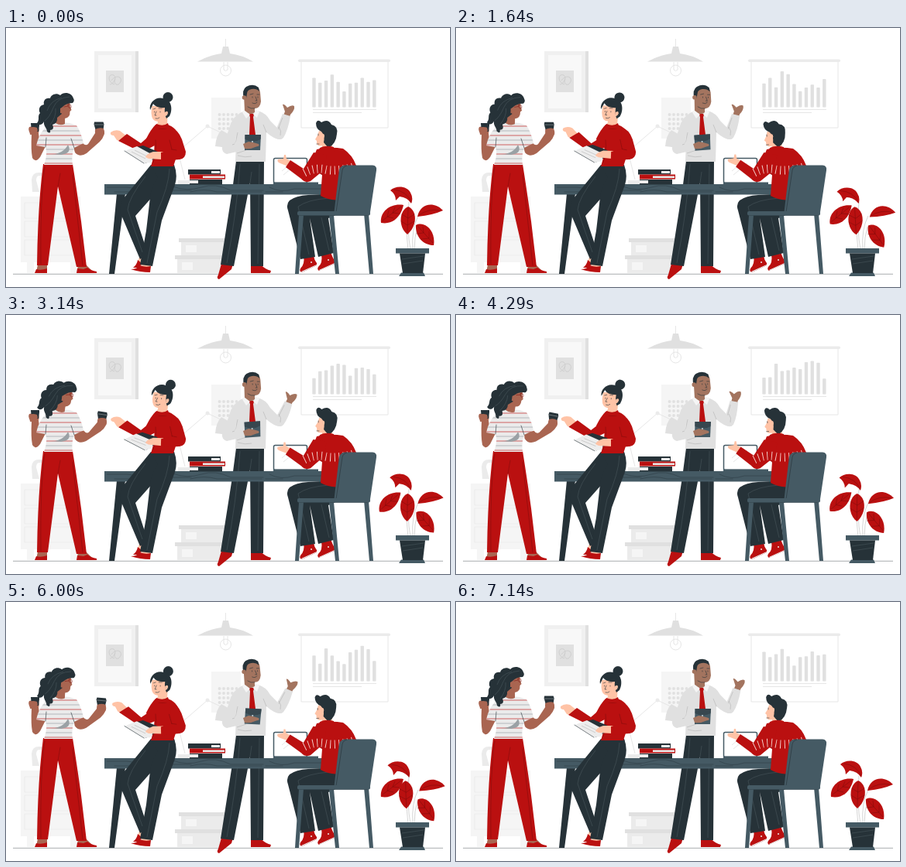
These frames come from a looping animation (573x335 px, 7210 ms). An HTML page:

```html
<!DOCTYPE html>
<html lang="en">
<head>
<meta charset="utf-8">
<title>Office meeting</title>
<style>
html, body { margin: 0; width: 100%; height: 100%; overflow: hidden; background: #fff; }
svg { display: block; width: 100vw; height: 100vh; }
.dark { fill: #263238; }
.slate { fill: #455a64; }
.red { fill: #ba1010; }
.brown { fill: #a96551; }
.tan { fill: #a3745f; }
.peach { fill: #ffc3a6; }
.cloth { fill: #e0e0e0; }
.g1 { fill: #f5f5f5; }
.g2 { fill: #ebebeb; }
.g3 { fill: #e0e0e0; }
.paper { fill: #ededed; }
.line { fill: none; stroke: #263238; stroke-width: .6; stroke-linecap: round; stroke-linejoin: round; }
.fold { fill: none; stroke: #7a0a0a; stroke-width: .5; stroke-linecap: round; }
.seam { fill: none; stroke: #5a676d; stroke-width: .4; }
.crease { fill: none; stroke: #aaa; stroke-width: .5; }
.pale { fill: none; stroke: #e6e6e6; stroke-width: 1; }
</style>
</head>
<body>
<svg viewBox="0 0 573 335">
<defs>
  <clipPath id="shirtShape"><path d="M55 125Q67 121 82 123L91 126Q97 135 100 149L88 155Q84 164 86 177H49Q54 164 51 154L39 152Q43 134 55 125Z"/></clipPath>
  <pattern id="stripes" width="90" height="12" patternUnits="userSpaceOnUse">
    <path class="g2" d="M0 0h90v12H0z"/>
    <path d="M0 1h90" stroke="#9aa1a5" stroke-width=".7"/>
    <path d="M0 7h90" stroke="#c63b3b" stroke-width=".8"/>
  </pattern>
  <pattern id="days" x="273" y="109" width="5.500" height="6" patternUnits="userSpaceOnUse">
    <circle class="g3" cx="2.500" cy="3" r="1.900"/>
  </pattern>
</defs>

<!-- wall -->
<path class="g3" d="M114 30h57v79h-57z"/>
<path d="M114 30h53v79h-53z" fill="#f0f0f0"/>
<path d="M119 35h43v69h-43z" fill="#f8f8f8"/>
<path class="g3" d="M129 55h23v28h-23z"/>
<path d="M140 73C130 70 132 58 139 61C144 64 138 73 134 73M136 68C143 58 152 65 147 71C143 77 138 70 141 66" fill="none" stroke="#cfcfcf"/>
<path class="pale" d="M283.500 14V24"/>
<path class="g3" d="M280 24h7l2 9Q305 35 319 43.500H247Q263 35 278 33z"/>
<circle class="pale" cx="283.500" cy="55" r="7"/>
<path class="pale" d="M281 44v10q2.500 3 5 0v-10"/>
<path class="g1" d="M265 90h38v53h-38z"/>
<path d="M273 109h27.500v24H273z" fill="url(#days)"/>
<path class="pale" d="M231 196L222 160L260 127L281 137"/>
<circle class="g2" cx="260" cy="127" r="2.500"/>
<path class="g3" d="M278 132L290 139L288 155L270 153Q271 139 278 132z"/>
<path class="g2" d="M222 197h18v5h-18z"/>
<path class="pale" d="M381 44v85h112v-85"/>
<rect class="g2" x="377" y="40.500" width="119" height="3.500" rx="1.700"/>
<g id="bars" class="g3"></g>
<path class="pale" d="M396 105.500h82M396 109.500h63"/>

<!-- cabinet and boxes -->
<path class="g1" d="M19 218h77v85h-77zM27 303h9v14h-9zM83 303h9v14h-9z"/>
<path class="pale" stroke-opacity=".5" d="M24 226h67v20h-67zM24 250h67v20h-67zM24 274h67v20h-67z"/>
<path class="g2" d="M33 196q1-9 9-9h7v4h-6q-4 0-4 6l4 15h-9z"/>
<path class="g3" d="M223 272h60v5h-60zM218 294h64v5h-64z"/>
<path class="g2" d="M226 277h56v17h-56zM221 299h61v18h-61z"/>
<path class="g1" d="M232 281h14v9h-14zM227 303h14v10h-14z"/>
<path d="M9 318.300H564" stroke="#6d7579" stroke-width=".6"/>

<!-- woman with coffee -->
<path class="brown" d="M41 306h12v10H39zM93 306h10l8 8H92z"/>
<path class="red" d="M39 312q6 2 14-1v6H37zM92 311l8 1 5-2q5 4 12 5v2H91z"/>
<path class="red" d="M48 176h38Q91 207 97 250L104 309H91L67 205L54 307H40Q41 230 48 176z"/>
<path class="fold" d="M67 205L70 188M50 180Q44 220 45 305M86 190L99 307"/>
<path class="brown" d="M40 147L31 136Q28 131 30 128L40 126Q44 130 42 136L43 144L51 153L44 167Q38 175 34 168Q32 158 33 138z"/>
<path class="dark" d="M32 123h11v3l-1 8h-9z"/>
<path class="brown" d="M30 129q5-2 10 0l1 4-5 4-5 1z"/>
<g id="coffeeArm">
  <path class="brown" d="M87 154L99 149Q103 153 106 150L115 136Q114 129 120 128Q128 129 127 137Q125 143 121 147L104 162Q95 168 89 161z"/>
  <path class="dark" d="M114 121.500h11.500l1 3-1 7h-10l-2-7z"/>
  <path d="M114 125h12" stroke="#a9b0b3" stroke-width=".5"/>
  <path class="brown" d="M115 131q6-3 11-1l1 6-9 3z"/>
</g>
<g clip-path="url(#shirtShape)">
  <path d="M30 115h80v70H30z" fill="url(#stripes)"/>
  <path d="M57 163Q73 164 80 151Q86 162 71 164z" fill="#9aa1a5"/>
</g>
<path class="line" d="M88 155L84 143M51 154L52 142"/>
<g id="coffeeHead">
  <path class="brown" d="M67 99L82 94L83 102L84.500 106L82.500 108Q83 116 76 117L76 124Q70 127 64 123z"/>
  <path class="dark" d="M87 91C85 83 74 82 70 87C64 83 58 87 57 91C50 90 48 95 49 99C42 100 42 107 44 110C40 114 44 118 40 123C43 127 47 125 49 121C48 127 53 129 53 134Q58 138 57 132Q63 132 60 125Q67 123 66 116L72 111Q69 104 73 102Q78 97 86 97Q89 94 87 91z"/>
  <path class="seam" d="M82 89Q66 90 61 103T50 120M72 90Q57 94 53 107M64 104Q65 115 57 125"/>
  <path class="brown" d="M70 104q5-3 5 2q-1 5-5 4z"/>
  <path class="fold" d="M75 102L80 101M80 99q5-1 4 4q-4 2-4-4"/>
</g>

<!-- standing man -->
<path class="red" d="M278 305h15l-2 7-16 13q-4-1-1-6zM316 306h13q5 6 13 8l-1 3h-25z"/>
<path class="dark" d="M297 172h36L332 308H316L315 200L294 308L277 306L292 210z"/>
<path class="seam" d="M302 176Q297 245 285 304M327 176L325 305M315 200l2-14"/>
<g id="waveArm">
  <path class="tan" d="M357 116L360 108L357 99Q359 98 363 103Q369 99 372 101Q373 106 367 112L365 118z"/>
  <path class="cloth" d="M357 111L367 114Q364 132 358 142Q352 147 346 140L349 130z"/>
  <path class="crease" d="M357 116l-7 18"/>
</g>
<path class="cloth" d="M306 108L325 107Q336 110 341 120L351 130L357 143Q350 147 336 135L335 173H296L297 145L294 122Q297 111 306 108z"/>
<path class="crease" d="M336 135l-4-10M299 165q10 3 18 1M352 128q4 5 2 11"/>
<path class="red" d="M313 111h8l-2 4 3 23-4 4-4-4 1-23z"/>
<path class="cloth" d="M299 113Q292 115 287 133L279 153Q278 161 285 163L311 157L309 148L296 149z"/>
<path class="crease" d="M296 149L299 135M295 150l-3 1M298 162l12-4"/>
<g id="tablet">
  <path class="slate" d="M308.500 138h20.500l-1 20H308z"/>
  <path d="M308.500 138h20.500l-.5 6q-9 5-20 0z" fill="#37474f"/>
  <circle cx="318" cy="147" r="1" fill="#cfd8dc"/>
</g>
<path class="tan" d="M306 150L313 147Q320 148 326 150Q328 153 323 153.500Q316 157 308 156z"/>
<g id="manHead">
  <path class="tan" d="M307 86Q309 75 319 75Q327 76 328 83L329 95Q328 104 321 104L321 109Q315 114 308 108z"/>
  <path class="dark" d="M307 91Q304 80 310 76Q319 71 326 77L327 82Q323 78 317 79Q311 80 311 85L310 91z"/>
  <circle class="tan" cx="307.500" cy="90" r="2.800"/>
  <path class="line" d="M315 86l4-1M324 86h3M318 89v1M325 89v1M322 89l2 5h-2M318 97q4 2 6-1M312 102q4 3 9 2"/>
</g>
<path class="g1" d="M307 106l8 6-5 5-5-8zM323 106l-4 6 5 4 3-8z"/>

<!-- table -->
<path class="dark" d="M143 214h11L140 318h-7z"/>
<path class="slate" d="M127 202H416v13.500H127z"/>
<path class="line" stroke-opacity=".7" d="M130 206h26q8 0 13 4h70M140 212h24M215 205q19 7 37 1t38 4h42M238 212q18-5 34 0h58M340 206q15 8 32 2h36M335 212h22"/>
<rect x="345.500" y="168.500" width="43" height="32" rx="2" fill="#fff" stroke="#455a64" stroke-width="1.500"/>
<path class="pale" d="M358 190l18-15M356 185l6-5"/>
<path class="slate" d="M345 199.500h58v2.500h-58z"/>
<path class="dark" d="M235 183h42v6.500h-42zM237 196h42v6.500h-42z"/>
<path class="red" d="M237 189.500h46v6h-46z"/>
<path class="paper" d="M265 185h11v3h-11zM254 191.500h28v2.500h-28zM237 197h11v4h-11z"/>

<!-- woman with notebook -->
<path class="peach" d="M172 296h10l-6 11h-7zM175 303h13l-2 8h-9z"/>
<path class="red" d="M170 300l6 5-6 5h-6q5-4 6-10zM173 307q7 3 14 1l-1 8q-13 0-25-4 8 0 12-5z"/>
<path class="dark" d="M187 177L152 220Q145 230 148 240L173 299L183 292L167 243L190 217L213 190z"/>
<path class="dark" d="M187 177H217Q222 190 218 203L201 249L189 308L173 306L181 262L186 219Q187 205 196 193z"/>
<path class="seam" d="M211 182Q210 205 195 238L182 304M180 192Q158 220 157 235L176 290"/>
<g id="reachArm">
  <path class="peach" d="M156 140L147 133Q140 131 135 135Q134 139 139 139L143 145L151 148z"/>
  <path class="red" d="M156 137L174 149L196 130L199 148L179 159Q171 162 165 156L145 146z"/>
</g>
<path class="red" d="M193 125Q203 121 211 126Q222 130 226 148L216 179H187Q193 160 191 148L183 154L181 143Q187 131 193 125z"/>
<path class="fold" d="M193 145Q195 160 190 174M194 129q8 3 16 0"/>
<g id="bookArm">
  <g id="notebook">
    <path class="dark" d="M168 154L177 152L196 160L192 169L180 175z"/>
    <path class="paper" d="M153 159L169 153L191 165L187 174L178 175z"/>
    <path class="line" d="M153 159L178 175"/>
    <path class="crease" d="M162 160l18 9M166 158l16 8"/>
  </g>
  <path class="peach" d="M203 160L190 160Q181 163 180 167L184 169L201 170z"/>
  <path class="red" d="M212 129Q222 131 227 144L232 160Q232 169 224 170L200 172V161L214 157z"/>
  <path class="fold" d="M214 157L211 145M214 157l6 1"/>
</g>
<g id="bookHead">
  <circle class="dark" cx="209" cy="89.500" r="6.500"/>
  <path class="peach" d="M188 101L209 101L208 126Q202 129 195 125L196 121Q188 121 187.500 110z"/>
  <path class="dark" d="M186 106C184 97 193 88 203 91C215 93 215 107 211 114L207 117Q204 111 205 103Q194 104 190 98Z"/>
  <path class="peach" d="M205 109q4-3 4 1q-1 4-4 4z"/>
  <path class="line" d="M190 105l3-1M197 104h4M191.500 108v1M199 108v1M194 108l-2 5h2M193 117q3 1 5-1"/>
</g>
<path class="red" d="M194 124Q203 128 209 123L211 130H193z"/>

<!-- seated man -->
<path class="red" d="M384 295l13-3q0 7 4 12v3l-19 9q-4-1-2-5 6-6 4-16zM407 293l12-3q2 6 5 11v4l-20 9q-3-2-1-5 6-5 4-16z"/>
<path class="paper" d="M381 315l20-9v1l-19 9zM404 313l20-9v1l-19 9z"/>
<circle class="paper" cx="394" cy="303" r="1"/>
<circle class="paper" cx="416" cy="300" r="1"/>
<path class="dark" d="M430 214L390 216Q374 217 366 223Q361 228 364 236L380 299L399 296L392 246L403 296L423 291L416 246L430 240z"/>
<path class="seam" d="M417 220Q389 222 377 231L391 293M407 245l10 43"/>
<path class="red" d="M401 157Q417 153 435 156Q447 164 452 178L432 222Q418 224 406 217L408 190L396 184Q396 167 401 157z"/>
<g id="talkArm">
  <path class="peach" d="M369 173L362 169L361 164H359L358 169L351 170Q349 173 354 175L364 179z"/>
  <path class="red" d="M367 171L384 182L397 161L414 164L411 183L393 198Q386 201 381 195L361 180z"/>
  <path class="fold" d="M408 190L402 180"/>
</g>
<path d="M385 187Q399 180 412 183T448 180" fill="none" stroke="#f5d5d0" stroke-width="11" stroke-dasharray=".9 4.800"/>
<g id="seatHead">
  <path class="peach" d="M404 133L421 136L421 154Q413 159 407 155L408 152Q400 154 401 146L399 144L402 139z"/>
  <path class="dark" d="M400 123Q402 117 407 122Q416 117 420 125Q429 127 427 137Q426 150 416 155L410 148Q412 139 407 134Q400 131 400 123z"/>
  <path class="peach" d="M407 138q4-3 4 2q-1 5-4 4z"/>
  <path class="line" d="M403 137v2M401 150h3"/>
</g>
<path class="red" d="M405 155Q413 151 423 154L424 160H403z"/>

<!-- chair -->
<path class="slate" d="M378 242h6L378 318h-5zM417 242h6L430 318h-5zM462 240h6L474 318h-5z"/>
<path class="slate" d="M437 177.500H473Q479 178 478 184L470 238Q469 242 464 242H423L430 183Q432 178 437 177.500z"/>
<path class="line" d="M440 178Q435 179 434 184L426 238M378 242.500h88"/>
<rect class="slate" x="376" y="237" width="94" height="5.500" rx="2"/>

<!-- plant -->
<path class="crease" d="M522 287Q517 260 520 225M525 287Q523 260 532 243M527 287Q527 270 531 257M519 287Q517 268 517 260"/>
<g id="leafTop"><path class="red" d="M496 210C503 203 518 204 522 213Q526 220 523 227Q518 219 508 218L503 223Q503 215 496 210z"/><path class="fold" d="M501 209Q517 211 523 225"/></g>
<g id="leafLeft"><path class="red" d="M513 229C496 226 482 238 484 252C500 255 510 243 513 229z"/><path class="fold" d="M510 231L486 249M502 232l-3 7 9 1M494 236l-2 8 8 2"/></g>
<g id="leafRight"><path class="red" d="M531 244C534 228 551 223 564 236Q551 242 531 244z"/><path class="fold" d="M533 242Q545 233 560 236"/></g>
<g id="leafLow"><path class="red" d="M529 255C540 249 555 262 552 281C537 281 528 268 529 255z"/><path class="fold" d="M531 256L551 278M538 257l1 8-9 1M546 263v9l-10 1"/></g>
<g id="leafMid"><path class="red" d="M519 231C531 236 531 256 518 267C506 258 507 236 519 231z"/><path class="fold" d="M519 233L518 264M511 241l8 5 8-5M510 250l8 5 9-5"/></g>
<path class="slate" d="M503 285h43v6.500h-43zM510 316.500h29l2 4.500h-34z"/>
<path class="dark" d="M508 291.500h33l-3 25.500h-26z"/>
<path class="seam" d="M511 299l28-4M512 305l26-4"/>
</svg>
<script>
const LOOP = 7210, STEPS = 101, TAU = 2 * Math.PI;

// cosine wave over one loop, highest at the given peak (0 to 1)
const wave = (phase, peak, cycles = 1) => Math.cos(TAU * cycles * (phase - peak));

// each part swings about its joint, starting from the drawn pose
const sways = [
  { id: 'coffeeArm', joint: '96 158', swing: 6, peak: .6 },
  { id: 'coffeeHead', joint: '66 122', swing: 4.5, peak: .55 },
  { id: 'reachArm', joint: '172 153', swing: 4.5, peak: .25, cycles: 2 },
  { id: 'bookArm', joint: '225 165', swing: 2, peak: .3 },
  { id: 'notebook', joint: '188 165', swing: -4, peak: .4 },
  { id: 'bookHead', joint: '203 124', swing: 3, peak: .45 },
  { id: 'waveArm', joint: '354 141', swing: 7, peak: .37, cycles: 2 },
  { id: 'tablet', joint: '318 152', swing: -4, peak: .3 },
  { id: 'manHead', joint: '315 108', swing: 1.5, peak: .25 },
  { id: 'talkArm', joint: '390 190', swing: 1.5, peak: .13, cycles: 2 },
  { id: 'seatHead', joint: '412 156', swing: 3.5, peak: .45, cycles: 2 },
  { id: 'leafTop', joint: '523 285', swing: -1.8, peak: .25, cycles: 2 },
  { id: 'leafLeft', joint: '523 285', swing: -2, peak: .42 },
  { id: 'leafMid', joint: '521 285', swing: -2.5, peak: .25, cycles: 2 },
  { id: 'leafRight', joint: '525 285', swing: 2, peak: .25, cycles: 2 },
  { id: 'leafLow', joint: '525 285', swing: 3, peak: .25, cycles: 2 }
];

const svg = document.querySelector('svg');
const BAR_BASE = 102.5, BAR_SWING = 9;
const barPeaks = [0, .2, .75, .17, .28, .45, .78, .7, .75, .72, .13];
const bars = barPeaks.map((peak, i) => {
  const node = document.createElementNS(svg.namespaceURI, 'rect');
  node.setAttribute('x', 395.3 + i * 7.78);
  node.setAttribute('width', 4.4);
  node.setAttribute('rx', .8);
  document.getElementById('bars').append(node);
  return { node, peak, level: 33 + 5 * Math.cos(TAU * (i - 3) / 5) };
});

function draw() {
  const phase = Math.floor(performance.now() % LOOP / LOOP * STEPS) / STEPS;
  for (const { id, joint, swing, peak, cycles } of sways) {
    const angle = swing * (wave(phase, peak, cycles) - wave(0, peak, cycles));
    document.getElementById(id).setAttribute('transform', `rotate(${angle} ${joint})`);
  }
  for (const { node, peak, level } of bars) {
    const height = level + BAR_SWING * wave(phase, peak);
    node.setAttribute('y', BAR_BASE - height);
    node.setAttribute('height', height);
  }
  requestAnimationFrame(draw);
}
draw();
</script>
</body>
</html>
```
